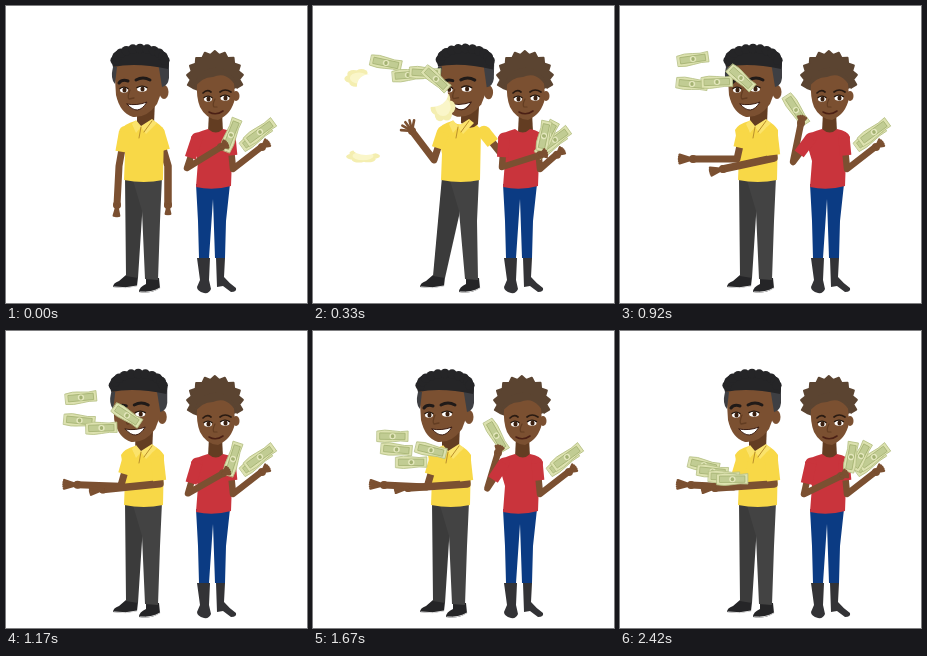
Animation of 301 by 297 pixels, one loop 2.51 s. Source, as an HTML page with a canvas:

```html
<!DOCTYPE html>
<html lang="en">
<head>
<meta charset="utf-8">
<title>Raining money</title>
<style>
html, body { margin: 0; height: 100%; overflow: hidden; background: #fff; }
canvas { display: block; }
</style>
</head>
<body>
<canvas id="stage" width="301" height="297"></canvas>
<script>
const c = document.getElementById('stage').getContext('2d');
const LOOP = 2510, STEPS = 30;
const SKIN = '#7b5031', SHADE = '#633d22', YELLOW = '#f8d847', RED = '#c9343c',
      GREY = '#434343', BLUE = '#0b3b83', BLACK = '#252527', CREAM = '#faf6c9', HAIR = '#5b4431';

// Blends the poses on either side of step n
function blend(times, poses, n) {
  const i = times.findIndex(t => t > n);
  if (i < 0) return poses[poses.length - 1];
  if (!i) return poses[0];
  const k = (n - times[i - 1]) / (times[i] - times[i - 1]);
  return poses[i - 1].map((v, j) => v + (poses[i][j] - v) * k);
}

function fill(d, color) {
  c.fillStyle = color;
  c.fill(new Path2D(d));
}

function line(d, color, w) {
  c.strokeStyle = color;
  c.lineWidth = w;
  c.lineCap = c.lineJoin = 'round';
  c.stroke(new Path2D(d));
}

function oval(x, y, rx, ry, color) {
  c.fillStyle = color;
  c.beginPath();
  c.ellipse(x, y, rx, ry, 0, 0, 7);
  c.fill();
}

function placed(x, y, rot, draw) {
  c.save();
  c.translate(x, y);
  c.rotate(rot);
  draw();
  c.restore();
}

function bill(x, y, deg, len = 31) {
  placed(x, y, deg * Math.PI / 180, () => {
    const h = len / 2;
    const sheet = `M${-h} -5Q${-h / 2} -7 0 -5.5T${h} -5.5L${h} 5Q${h / 2} 4 0 5.5T${-h} 5.5Z`;
    fill(sheet, '#dde2b0');
    line(sheet, '#b5c084', .8);
    c.fillStyle = '#c1cc93';
    c.fillRect(3 - h, -3.2, len - 6, 6.4);
    c.strokeStyle = '#a4b272';
    c.strokeRect(3 - h, -3.2, len - 6, 6.4);
    oval(0, 0, 3.2, 3, '#e4e7bd');
    oval(0, 0, 1.7, 2, '#a4b272');
  });
}

function arm(sx, sy, ex, ey, hx, hy, shirt, w, cover) {
  line(`M${sx} ${sy}L${ex} ${ey}L${hx} ${hy}`, SKIN, w);
  oval(sx, sy, w * .85, w * .85, shirt);
  c.lineCap = 'butt';
  c.strokeStyle = shirt;
  c.lineWidth = w * 1.75;
  c.beginPath();
  c.moveTo(sx, sy);
  c.lineTo(sx + (ex - sx) * cover, sy + (ey - sy) * cover);
  c.stroke();
}

// Fingers fan out around the forearm direction
function hand(ex, ey, hx, hy, spread, len) {
  const a = Math.atan2(hy - ey, hx - ex);
  oval(hx, hy, 4, 4, SKIN);
  for (let i = -2; i <= 2; i++) {
    const b = a + i * spread;
    line(`M${hx} ${hy}L${hx + len * Math.cos(b)} ${hy + len * Math.sin(b)}`, SKIN, 2.6);
  }
}

function eye(x, y, w) {
  oval(x, y, w, 2.8, '#fff');
  oval(x + .5, y, 2.1, 2.5, '#3a2010');
  line(`M${x - w} ${y - 1.4}Q${x} ${y - 4.4} ${x + w} ${y - 1.4}`, '#20140c', 1.3);
}

function manHead() {
  c.translate(-140, -115);
  fill('M131 98L149 94L148 118Q140 126 131 117Z', SHADE);
  oval(158, 86, 4.5, 7, SKIN);
  fill('M108 58L110 89Q114 107 127 111Q141 112 151 98L157 82L156 55Z', SKIN);
  fill('M152 56H163V72Q162 80 156 81Z', '#3e3f43');
  fill('M107 61Q104 73 109 78L111 61Z', '#3e3f43');
  fill('M107 61Q103 49 112 44Q132 36 154 43Q166 49 162 63Q130 56 107 61Z', BLACK);
  for (let i = 0; i < 11; i++) {
    const a = Math.PI * (1.04 + i * .092);
    oval(134 + 25 * Math.cos(a), 56 + 13.5 * Math.sin(a), 4.8, 4.8, BLACK);
  }
  line('M113 77Q116 73 122 75M130 74Q137 70 144 74', '#201a18', 3);
  eye(118, 84, 4);
  eye(136, 83, 5);
  line('M124 84Q121 91 123 93L128 92', SHADE, 1.3);
  const smile = 'M121 98Q131 100 141 96Q132 111 121 98';
  fill(smile, '#fff');
  line(smile, '#3b1d13', 1);
}

// head shift and tilt, body shift, left elbow, left hand, right shoulder x, elbow, hand, foot shift, finger spread
const STAND = [0, 0, 0, 113, 160, 111, 199, 152, 162, 160, 162, 199, 0, .12];
const WAVE = [17, .02, 10, 121, 154, 99, 125, 171, 187, 146, 202, 138, 13, .42];
const LEAN = [20, .13, ...WAVE.slice(2)];
const CATCH = [-1, 0, 0, 117, 153, 73, 153, 151, 154, 152, 103, 163, 0, .15];
const HOLD = [-2, 0, 0, 114, 156, 71, 154, 151, 154, 153, 95, 157, 0, .15];
const MAN = [STAND, WAVE, WAVE, LEAN, LEAN, CATCH, CATCH, HOLD];
const MAN_TIMES = [1, 3, 4, 7, 8, 10, 11, 15];

function cluster(x, y, w, h, s) {
  for (let a = 0; a < 6; a++) {
    oval(x + w * .65 * Math.cos(a), y + h * .65 * Math.sin(a), w * .48 * s, h * .5 * s, '#f4eeb0');
  }
  oval(x, y, w * .7 * s, h * .7 * s, CREAM);
}

function poof(n) {
  if (n < 1 || n > 5) return;
  if (n < 4) {
    const r = n * 14;
    cluster(85, 105, r, r, 1);
    oval(85, 105, r * .7, r * .7, '#fff');
    return;
  }
  const s = n === 4 ? 1 : .55;
  cluster(46, 72, 13, 8, s);
  cluster(50, 150, 15, 6, s);
  cluster(130, 101, 11, 13, s);
  if (n === 4) {
    oval(118, 88, 17, 13, '#fff');
    oval(57, 80, 13, 12, '#fff');
    oval(53, 143, 13, 6, '#fff');
  }
}

function man(n) {
  const [headX, tilt, bx, lex, ley, lhx, lhy, rsx, rex, rey, rhx, rhy, f, spread] = blend(MAN_TIMES, MAN, n);
  const caught = n > 8;
  const right = () => {
    arm(rsx, 126, rex, rey, rhx, rhy, YELLOW, 7.5, caught ? .88 : .55);
    hand(rex, rey, rhx, rhy, spread, caught ? 13 : 9);
  };
  if (!caught) right();
  fill('M120 269L132 271L131 280Q119 283 107 281Q107 277 113 275Z', BLACK);
  fill(`M${140 + f} 272H${153 + f}L${154 + f} 282Q${145 + f} 288 ${133 + f} 286Q${133 + f} 281 ${140 + f} 278Z`, BLACK);
  line(`M108 281Q120 283 131 280M${134 + f} 286Q${146 + f} 287 ${154 + f} 282`, '#ddd', 1);
  fill(`M${119 + bx} 171H${139 + bx}L${136 + bx} 210L132 272L120 270Z`, '#3b3b3b');
  fill(`M${126 + bx} 171H${156 + bx}L${154 + bx} 215L${152 + f} 274L${139 + f} 273L${136 + bx} 205Z`, GREY);
  placed(bx, 0, 0, () =>
    fill('M129 115Q118 118 115 124L119 148L118 174Q138 178 157 174L158 124Q154 118 148 115Q138 122 129 115Z', YELLOW));
  placed(140 + headX, 115, tilt, manHead);
  placed(bx, 0, 0, () => {
    fill('M130 114L135 120L146 113L151 117L140 128L135 121L130 127L126 118Z', '#fbe36c');
    line('M135 121L133 132M146 115L138 126', '#ba8f2c', 1);
  });
  poof(n);
  arm(caught ? 123 : 119 + bx * 1.1, 126, lex, ley, lhx, lhy, YELLOW, 7, .58);
  hand(lex, ley, lhx, lhy, spread, caught ? 14 : 11);
  if (caught) right();
}

function womanHead() {
  fill('M203 106H216L217 126Q210 132 202 126Z', SHADE);
  let tufts = 'M209 90';
  for (let i = 0; i < 23; i++) {
    const a = Math.PI * (.86 + i * .058), r = i % 2 ? 1.04 : .9;
    tufts += `L${209 + 27 * r * Math.cos(a)} ${72 + 26 * r * Math.sin(a)}`;
  }
  fill(tufts, HAIR);
  line(tufts, HAIR, 2);
  oval(230, 90, 3.5, 5, SKIN);
  fill('M191 76Q193 66 206 67Q221 62 228 76L229 92Q226 108 212 114Q200 113 194 101Q190 91 191 76Z', SKIN);
  fill('M188 83Q190 64 207 62Q226 60 232 83L226 75Q218 66 207 71Q195 71 188 83Z', HAIR);
  line('M197 87Q201 83 205 86M214 86Q219 82 225 86', '#2a1b12', 1.7);
  eye(202, 93, 4);
  eye(219, 92, 4.5);
  line('M209 93Q206 99 208 101H211', SHADE, 1.2);
  line('M203 106Q210 110 217 105', '#4b2015', 1.6);
}

// elbow, hand, bill, bill angle, bill held, shift of the other hand
const TAKE = [181, 162, 215, 141, 225, 129, -68, 1, 0];
const PICK = [189, 161, 227, 149, 231, 130, -78, 0, -12];
const FAN = [184, 163, 221, 145, 231, 126, -80, 0, 0];
const RAISE = [175, 158, 187, 124, 187, 105, 62, 1, 0];
const FLICK = [173, 156, 181, 117, 176, 104, 57, 1, 0];
const WOMAN = [TAKE, PICK, RAISE, FLICK, TAKE, FAN, FAN, RAISE, FLICK, TAKE, FAN];
const WOMAN_TIMES = [0, 4, 7, 11, 13, 16, 17, 19, 22, 24, 28];

function woman(n) {
  const [ex, ey, hx, hy, bx, by, turn, held, shift] = blend(WOMAN_TIMES, WOMAN, n);
  fill('M191 252H204L203 274L205 283Q203 288 198 287Q191 285 191 281L194 274Z', '#333336');
  fill('M210 252H219L218 271Q223 277 230 282Q231 286 225 286L217 280L211 281Z', '#333336');
  fill('M190 178H224L220 215L219 252H209L207 193L203 252H193L192 215Z', BLUE);
  placed(-shift / 4, 0, 0, womanHead);
  fill('M202 123Q210 130 217 123Q228 125 230 131L226 152L225 180Q207 185 190 181L192 155L185 131Q190 126 202 123Z', RED);
  const rx = 256 + shift, ry = 141 - shift * .65;
  arm(224, 132, 227, 163, rx - 2, ry + 1, RED, 6.5, .56);
  bill(rx - 6, ry - 10, -36, 34);
  bill(rx - 2, ry - 15, -36, 34);
  if (held < .5) {
    bill(241 + shift / 2, 125 - shift / 3, -62, 30);
    bill(bx, by, turn, 30);
  }
  hand(227, 163, rx, ry, .25, 8);
  if (held >= .5) bill(bx, by, turn, 34);
  arm(191, 132, ex, ey, hx, hy, RED, 6.5, .66);
  hand(ex, ey, hx, hy, .3, 7);
}

// x, y, angle of each falling bill at the shared times
const BILL_TIMES = [4, 7, 11, 17, 24, 29];
const BILLS = [
  [[73, 57, 12], [72, 45, -9], [73, 53, -8], [77, 80, -3], [83, 139, 6], [84, 133, 15]],
  [[95, 69, -5], [73, 82, 6], [72, 78, 6], [75, 101, 5], [95, 142, 5], [92, 140, 6]],
  [[112, 67, 4], [97, 66, 3], [97, 76, -2], [94, 118, -2], [104, 149, 3], [104, 145, 2]],
  [[123, 73, 42], [127, 67, 46], [121, 72, 42], [121, 97, 25], [114, 149, -2], [112, 148, 0]],
];

function draw() {
  const t = performance.now() % LOOP;
  const n = Math.floor((t + 5) * STEPS / LOOP) % STEPS;
  c.fillStyle = '#fff';
  c.fillRect(0, 0, 301, 297);
  man(n);
  if (n > 2) BILLS.forEach(path => bill(...blend(BILL_TIMES, path, n)));
  woman(n);
  requestAnimationFrame(draw);
}
draw();
</script>
</body>
</html>
```
